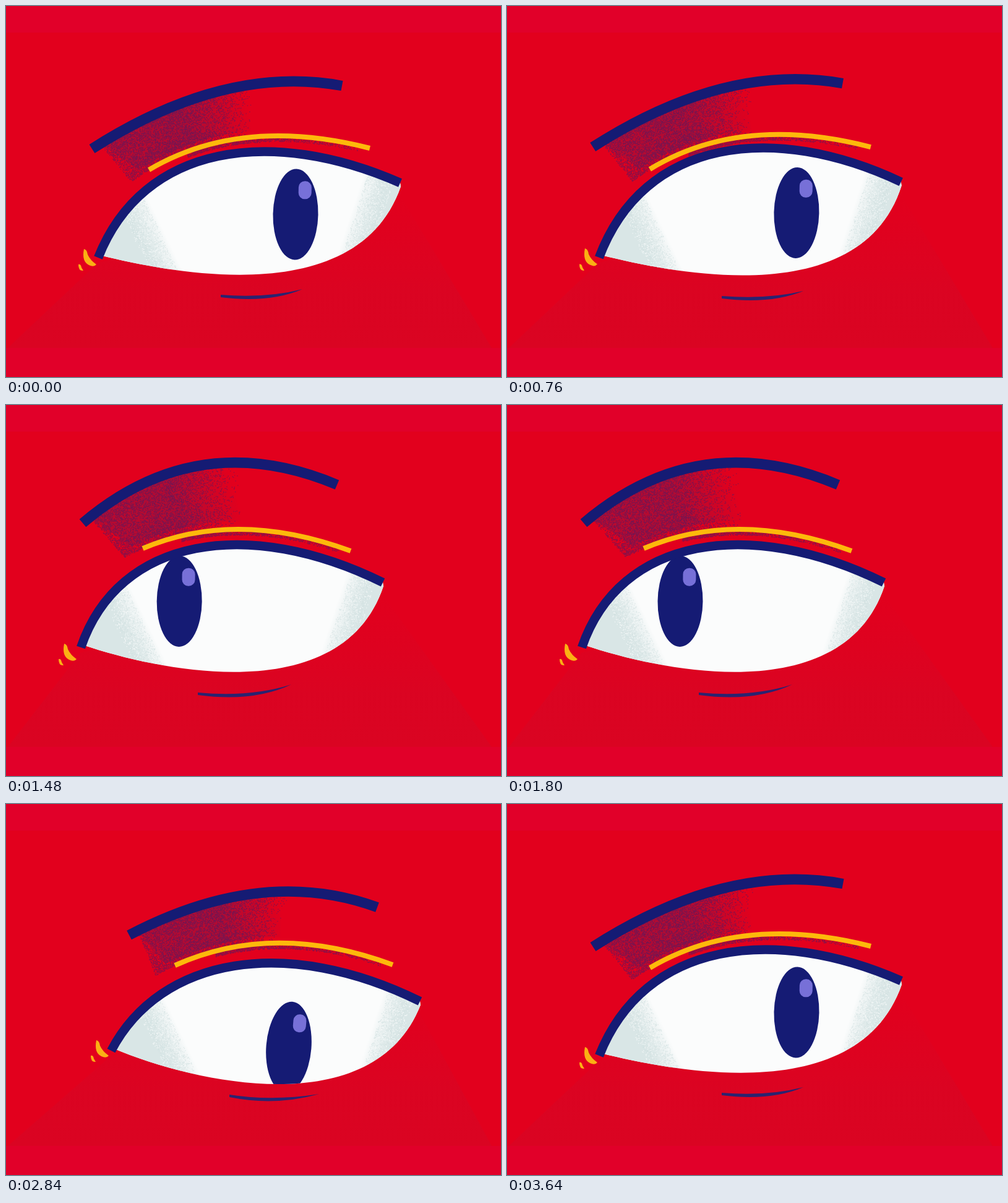
These frames come from a looping animation (800x600 px, 3.68 s). An HTML page with a canvas:

```html
<!DOCTYPE html>
<html lang="en">
<head>
<meta charset="utf-8">
<title>Eye</title>
<style>
html, body { margin: 0; width: 100%; height: 100%; overflow: hidden; background: #e2001d; }
canvas { display: block; width: 800px; height: 600px; }
</style>
</head>
<body>
<canvas id="stage" width="800" height="600"></canvas>
<script>
const ctx = document.getElementById('stage').getContext('2d');
const LOOP = 3680, STEP = 40;
const NAVY = '#151b74', GOLD = '#fdb90b';

// Curves are flat x,y lists; pupil is x,y,tilt; foot is x,y,squash.
const rest = {
  brow: [139, 231, 353, 94, 543, 129], fold: [231, 265, 380, 177, 588, 230],
  lid: [149, 407, 222, 222, 430, 195, 637, 286], low: [300, 440, 572, 482],
  pupil: [468, 337, .02], foot: [126, 393, 1], crease: [347, 469, 420, 477, 479, 459], smear: [0]
};
const squint = {
  brow: [142, 265, 360, 130, 549, 175], fold: [233, 277, 395, 211, 590, 252],
  lid: [151, 409, 230, 318, 420, 285, 640, 304], low: [320, 443, 530, 442],
  pupil: [469, 367, 0], foot: [127, 405, .72], crease: [346, 447, 415, 456, 474, 428], smear: [1]
};
const lift = {
  brow: [137, 230, 352, 58, 541, 130], fold: [229, 264, 380, 177, 586, 230],
  lid: [148, 406, 221, 222, 429, 195, 636, 286], low: [299, 440, 571, 482],
  pupil: [457.5, 340, .02], foot: [120, 393, 1], crease: [348, 468, 430, 478, 497, 453], smear: [0]
};
const left = {
  brow: [124, 191, 309, 34, 535, 129], fold: [221, 232, 372, 168, 557, 236],
  lid: [121, 392, 182, 213, 392, 180, 609, 287], low: [270, 437, 546, 485],
  pupil: [280, 317.5, .01], foot: [94, 386, 1], crease: [310, 467, 395, 477, 461, 453], smear: [0]
};
const down = {
  brow: [170, 231, 387, 119, 583, 187], fold: [260, 270, 420, 198, 612, 271],
  lid: [155, 405, 235, 254, 440, 225, 655, 331], low: [300, 465, 580, 522],
  pupil: [423, 403, .09], foot: [131, 390, 1], crease: [352, 480, 420, 491, 484, 481], smear: [0]
};
const right = {
  brow: [199, 212, 414, 99, 600, 167], fold: [273, 261, 433, 189, 625, 260],
  lid: [170, 399, 250, 246, 455, 213, 669, 319], low: [315, 455, 596, 513],
  pupil: [457, 393, .08], foot: [146, 382, 1], crease: [361, 472, 430, 485, 506, 470], smear: [0]
};

const inOut = t => t * t * (3 - 2 * t);
const easeIn = t => t * t;
const easeOut = t => 1 - (1 - t) ** 3;
const backOut = t => 1 + 2.8 * (t - 1) ** 3 + 1.8 * (t - 1) ** 2;

// [time, pose, easing towards it]
const keys = [
  [0, rest], [80, rest, inOut], [400, squint, inOut], [480, squint, inOut],
  [880, rest, backOut], [1000, rest, inOut], [1120, lift, easeIn], [1520, left, easeOut],
  [1840, left, inOut], [2200, down, inOut], [2440, down, inOut], [2760, right, inOut],
  [2840, right, inOut], [3280, rest, inOut], [LOOP, rest, inOut]
];

function poseAt(time) {
  const i = keys.findIndex(k => k[0] > time);
  const [t0, a] = keys[i - 1], [t1, b, ease] = keys[i];
  const k = ease((time - t0) / (t1 - t0)), out = {};
  for (const part in a) out[part] = a[part].map((v, n) => v + (b[part][n] - v) * k);
  return out;
}

function random(seed) {
  let s = seed * 7919 + 17;
  return () => {
    s = (s + 0x6D2B79F5) | 0;
    let r = Math.imul(s ^ (s >>> 15), s | 1);
    r ^= r + Math.imul(r ^ (r >>> 7), r | 61);
    return ((r ^ (r >>> 14)) >>> 0) / 4294967296;
  };
}

const quadAt = ([ax, ay, bx, by, cx, cy], t) => {
  const a = (1 - t) ** 2, b = 2 * t * (1 - t), c = t * t;
  return [a * ax + b * bx + c * cx, a * ay + b * by + c * cy];
};

function stroke(p, color, width) {
  ctx.beginPath();
  ctx.moveTo(p[0], p[1]);
  if (p.length > 6) ctx.bezierCurveTo(...p.slice(2));
  else ctx.quadraticCurveTo(...p.slice(2));
  ctx.strokeStyle = color;
  ctx.lineWidth = width;
  ctx.stroke();
}

// Brush mark that tapers at both ends
function brush([ax, ay, bx, by, cx, cy], color, width) {
  ctx.beginPath();
  ctx.moveTo(ax, ay - 2);
  ctx.quadraticCurveTo(bx, by - width, cx, cy - 1);
  ctx.quadraticCurveTo(bx + 5, by + width, ax, ay + 2);
  ctx.fillStyle = color;
  ctx.fill();
}

function ellipse(x, y, rx, ry, color) {
  ctx.beginPath();
  ctx.ellipse(x, y, rx, ry, 0, 0, 7);
  ctx.fillStyle = color;
  ctx.fill();
}

function specks(count, color, size, place) {
  ctx.beginPath();
  for (let i = 0; i < count; i++) {
    const p = place();
    if (p) ctx.rect(p[0], p[1], size, size);
  }
  ctx.fillStyle = color;
  ctx.fill();
}

function background({ lid }) {
  ctx.fillStyle = '#e2001d';
  ctx.fillRect(0, 0, 800, 600);
  const g = ctx.createLinearGradient(0, 300, 0, 553);
  g.addColorStop(0, 'rgba(218,4,34,0)');
  g.addColorStop(.65, 'rgba(218,4,34,.9)');
  g.addColorStop(1, 'rgb(218,4,34)');
  ctx.beginPath();
  ctx.moveTo(3, 553);
  ctx.lineTo(lid[0], lid[1] + 8);
  ctx.lineTo(lid[6], lid[7] + 20);
  ctx.lineTo(785, 553);
  ctx.fillStyle = g;
  ctx.fill();
  ctx.fillStyle = '#e10029';
  ctx.fillRect(0, 0, 800, 43);
  ctx.fillRect(0, 553, 800, 47);
}

function shadow({ brow, fold }, rnd) {
  const at = (u, v) => {
    const [x0, y0] = quadAt(brow, .03 + .6 * u), [x1, y1] = quadAt(fold, -.1 + .6 * u);
    return [x0 + (x1 - x0) * v, y0 + (y1 - y0) * v];
  };
  const [x0, y0] = at(0, .2), [x1, y1] = at(1, .2);
  const g = ctx.createLinearGradient(x0, y0, x1, y1);
  g.addColorStop(0, 'rgba(90,30,90,.28)');
  g.addColorStop(.55, 'rgba(90,30,90,.36)');
  g.addColorStop(.95, 'rgba(90,30,90,0)');
  ctx.beginPath();
  for (let u = 0; u <= 1; u += .05) ctx.lineTo(...at(u, 0));
  for (let u = 1; u >= .05; u -= .05) ctx.lineTo(...at(u, .88));
  ctx.fillStyle = g;
  ctx.fill();
  specks(9000, 'rgba(62,30,108,.5)', 1.4, () => {
    const u = rnd(), v = rnd();
    const fade = Math.min(1, (1 - u) * 2.2) * (.55 + .45 * Math.abs(1 - 2 * v));
    return rnd() < fade && at(u, v);
  });
  // dusting below the gold line
  specks(1500, 'rgba(62,30,108,.5)', 1.4, () => {
    const t = .2 + rnd() * .75, [x, y] = quadAt(fold, t);
    return rnd() < 1.15 - t && [x, y + 3 + rnd() * 6];
  });
}

function shade(x, y, nx, ny, rnd) {
  const g = ctx.createLinearGradient(x - nx * 24, y - ny * 24, x + nx * 18, y + ny * 18);
  g.addColorStop(0, 'rgba(217,230,230,0)');
  g.addColorStop(.6, 'rgba(217,230,230,.75)');
  g.addColorStop(1, 'rgb(217,230,230)');
  ctx.fillStyle = g;
  ctx.fillRect(0, 0, 800, 600);
  const grain = (count, color, from, span) => specks(count, color, 1.3, () => {
    const d = from + span * rnd(), s = (rnd() - .5) * 170;
    return [x + nx * d - ny * s, y + ny * d + nx * s];
  });
  grain(900, 'rgba(205,222,222,.6)', -18, 40);
  grain(500, 'rgba(251,252,252,.7)', -10, 35);
}

function eye({ lid, low, pupil }, rnd) {
  const [sx, sy] = lid, [ex, ey] = lid.slice(6);
  ctx.save();
  ctx.beginPath();
  ctx.moveTo(sx, sy);
  ctx.bezierCurveTo(...lid.slice(2));
  ctx.lineTo(ex + 1, ey + 6);
  ctx.bezierCurveTo(low[2], low[3], low[0], low[1], sx + 3, sy - 4);
  ctx.fillStyle = '#fbfcfc';
  ctx.fill();
  ctx.clip();
  shade(sx + 82, sy - 38, -.9, .43, rnd);
  shade(ex - 53, ey + 45, .95, .31, rnd);
  ctx.translate(pupil[0], pupil[1]);
  ctx.rotate(pupil[2]);
  ellipse(0, 0, 36.5, 73.5, NAVY);
  ctx.beginPath();
  ctx.roundRect(4, -54, 21, 29, 10);
  ctx.fillStyle = '#7770d8';
  ctx.fill();
  ctx.restore();
  stroke(lid, NAVY, 14.5);
}

function crowFoot([x, y, squash]) {
  ctx.save();
  ctx.translate(x, y);
  ctx.scale(1, squash);
  ctx.fillStyle = '#fbb014';
  ctx.beginPath();
  ctx.moveTo(0, 0);
  ctx.quadraticCurveTo(5, 1, 6, 9);
  ctx.quadraticCurveTo(10, 18, 20, 25);
  ctx.quadraticCurveTo(16, 30, 8, 26);
  ctx.quadraticCurveTo(-4, 20, 0, 0);
  ctx.fill();
  ctx.beginPath();
  ctx.moveTo(-9, 25);
  ctx.quadraticCurveTo(-5, 24, -4, 30);
  ctx.lineTo(-1, 35);
  ctx.quadraticCurveTo(-9, 36, -9, 25);
  ctx.fill();
  ctx.restore();
}

function draw(time) {
  const pose = poseAt(time), rnd = random(1 + Math.floor(time / 120));
  background(pose);
  shadow(pose, rnd);
  stroke(pose.brow, NAVY, 16.5);
  stroke(pose.fold, GOLD, 8);
  const [fx, fy] = pose.fold;
  ctx.globalAlpha = Math.max(0, pose.smear[0]) * .55;
  brush([fx + 87, fy + 16, fx + 155, fy - 8, fx + 217, fy - 6], '#3b2060', 4);
  ctx.globalAlpha = 1;
  eye(pose, rnd);
  crowFoot(pose.foot);
  brush(pose.crease, '#2a2370', 4);
}

function tick() {
  const time = performance.now() % LOOP;
  draw(Math.floor(time / STEP) * STEP);
  requestAnimationFrame(tick);
}
tick();
</script>
</body>
</html>
```
